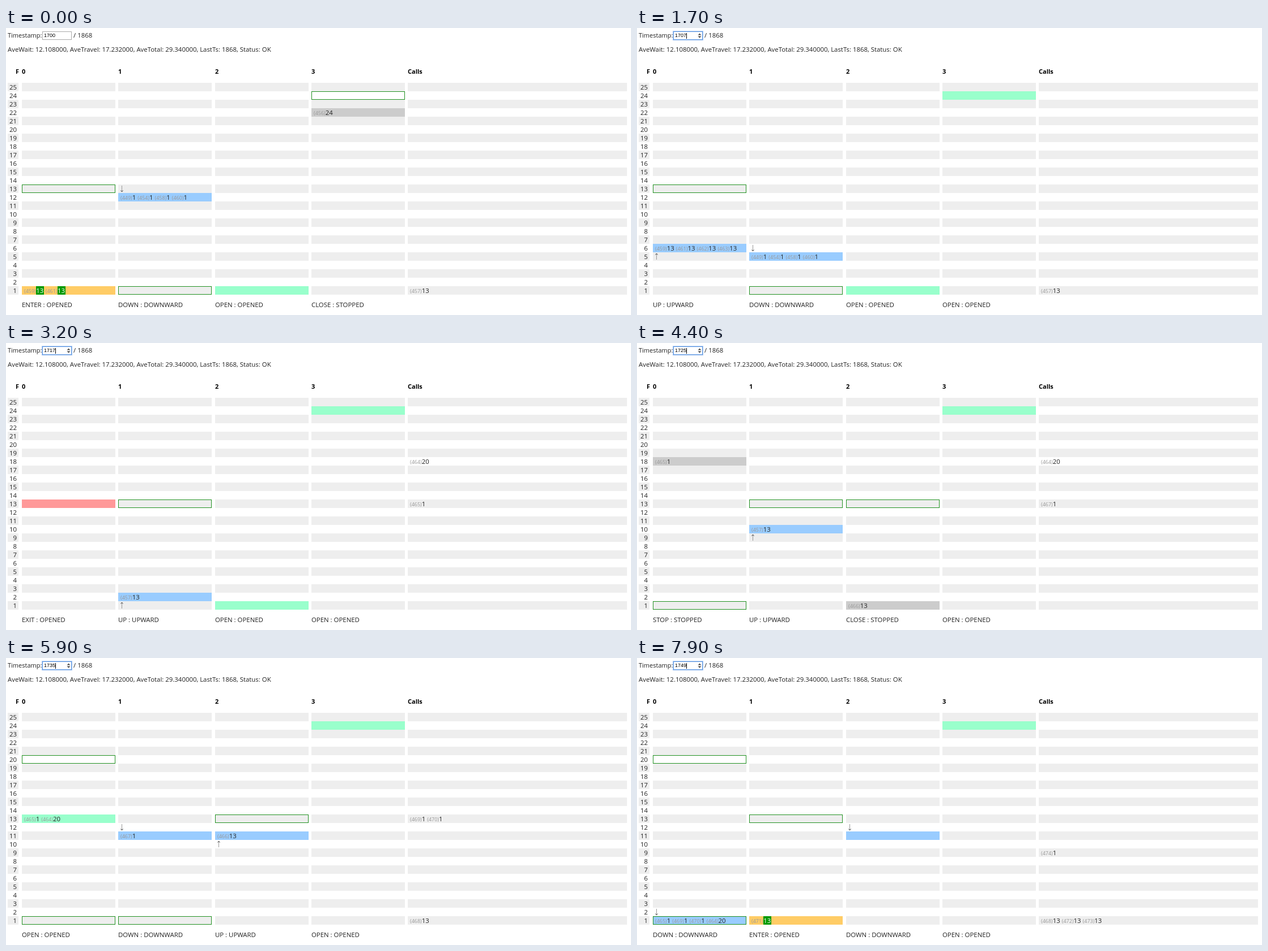
Write an HTML page that moves like this. It is 1103 px wide and 508 px high and loops after 8 s.

```html
<!DOCTYPE html>
<html lang="en">
<head>
<meta charset="utf-8">
<style>
  html, body { margin: 0; width: 100%; height: 100%; overflow: hidden; background: #fff; }
  body { position: relative; font: 11.4px/15px "Open Sans", "Noto Sans", sans-serif; color: #222; }
  body div { position: absolute; box-sizing: border-box; white-space: pre; }
  .head { font-weight: bold; color: #000; font-size: 11px; }
  .num { text-align: right; padding-right: 3px; }
  .odd { background: #eee; }
  .riders { display: flex; gap: 3px; padding-left: 4px; }
  .riders small { font-size: 9px; color: #999; }
  .riders b { font-weight: normal; background: #090; color: #fff; padding: 0 .5px; }
  .goal { border: 1px solid #229122; }
  svg { position: absolute; left: 0; top: 0; fill: none; }
  #field { left: 64px; top: 6px; width: 52px; height: 15px; border: 1px solid #aaa;
    font: 9px/13px "Liberation Sans", Arial, sans-serif; color: #000; padding-left: 2px; }
  #field.focus { border-color: #5b95e0; box-shadow: 0 0 0 1px #a9c8f2; }
  #field i { display: none; position: absolute; left: 22px; top: 2px; width: 1px; height: 10px; background: #000; }
  #field.focus i { display: block; }
  #field svg { display: none; left: 42px; top: 2px; fill: #444; }
  #field.hover svg { display: block; }
</style>
</head>
<body>
<div style="left:3px;top:5px;font-size:11px">Timestamp:</div>
<div id="field"><span id="stamp"></span><i></i><svg width="7" height="9"><path d="M0.5 3.5 3.5 0.5 6.5 3.5zM0.5 5.5 3.5 8.5 6.5 5.5z"/></svg></div>
<div style="left:119px;top:5px">/ 1868</div>
<div style="left:3px;top:30px">AveWait: 12.108000, AveTravel: 17.232000, AveTotal: 29.340000, LastTs: 1868, Status: OK</div>
<div id="grid"></div>
<div id="live"></div>
<script>
const LOOP = 8000, FLOORS = 25, CAR_W = 165, CALLS_X = 709, CALLS_W = 387;
const COLOR = { UP: '#9cf', DOWN: '#9cf', OPEN: '#9fc', ENTER: '#fc6', EXIT: '#f99', STOP: '#ccc', CLOSE: '#ccc' };
const STATE = { UP: 'UPWARD', DOWN: 'DOWNWARD', STOP: 'STOPPED', CLOSE: 'STOPPED' };
const $ = id => document.getElementById(id);
const carX = c => Math.round(28 + 170.4 * c);
const rowY = floor => 112 + (24 - floor) * 15;

// One command per tick; "UP*5" repeats it.
const cars = [
  [1, 'ENTER*2 CLOSE UP*12 STOP OPEN EXIT ENTER CLOSE UP*5 STOP OPEN ENTER CLOSE DOWN*5 STOP OPEN ENTER CLOSE DOWN*12'],
  [13, 'DOWN*12 STOP OPEN EXIT ENTER CLOSE UP*12 STOP OPEN EXIT ENTER CLOSE DOWN*12 STOP OPEN EXIT ENTER'],
  [1, 'OPEN*24 ENTER CLOSE UP*12 STOP OPEN EXIT OPEN*6 CLOSE DOWN*2'],
  [22, 'CLOSE UP*2 STOP OPEN EXIT OPEN*44']
].map(([floor, script]) => script.split(' ').flatMap(word => {
  const [cmd, n = 1] = word.split('*');
  return Array.from({ length: +n }, () => {
    const prev = floor;
    floor += cmd === 'UP' ? 1 : cmd === 'DOWN' ? -1 : 0;
    return { cmd, floor, prev };
  });
}));

// id, destination, car, boarding tick, then floor and tick of the call
const LATER = 99;
const people = [
  [449, 1, 1, -1], [454, 1, 1, -1], [456, 24, 3, -1], [457, 13, 1, 15, 1, 0],
  [458, 1, 1, -1], [459, 13, 0, 0], [460, 1, 1, -1], [461, 13, 0, 0],
  [462, 13, 0, 1], [463, 13, 0, 1], [464, 20, 0, 27, 18, 10], [465, 1, 0, 18, 13, 14],
  [466, 13, 2, 24], [467, 1, 1, 32, 13, 25], [468, 13, 0, LATER, 1, 28],
  [469, 1, 0, 36, 13, 31], [470, 1, 0, 36, 13, 34], [471, 13, 1, 49, 1, 38],
  [472, 13, 0, LATER, 1, 41], [473, 13, 0, LATER, 1, 44], [474, 1, 0, LATER, 9, 47]
].map(([id, dest, car, board, floor, call]) => {
  const exit = cars[car].findIndex((s, t) => t > board && s.cmd === 'EXIT');
  return { id, dest, car, board, floor, call, exit: exit < 0 ? Infinity : exit };
});

function box(x, y, w, cls = '', body = '', style = '') {
  return `<div class="${cls}" style="left:${x}px;top:${y}px;width:${w}px;height:15px;${style}">${body}</div>`;
}

function chip(p, t) {
  const tag = p.board === t ? 'b' : 'span';
  return `<span><small>(${p.id})</small><${tag}>${p.dest}</${tag}></span>`;
}

function arrow(up) {
  const flip = up ? ' transform="matrix(1 0 0 -1 0 15)"' : '';
  return `<svg width="13" height="15"><g${flip}><path d="M6.5 2V13" stroke="#999"/>` +
    '<path d="M4.5 10.5 6.5 13 8.5 10.5" stroke="#444"/></g></svg>';
}

function drawGrid() {
  let html = box(3, 69, 20, 'head', 'F', 'text-align:right');
  for (let c = 0; c < 4; c++) html += box(carX(c), 69, CAR_W, 'head', c);
  html += box(CALLS_X, 69, CALLS_W, 'head', 'Calls');
  for (let f = 1; f <= FLOORS; f++) {
    const odd = f % 2 ? 'odd' : '', y = rowY(f);
    html += box(3, y, 19, 'num ' + odd, f);
    for (let c = 0; c < 4; c++) html += box(carX(c), y, CAR_W, odd);
    html += box(CALLS_X, y, CALLS_W, odd);
  }
  $('grid').innerHTML = html;
}

function drawCar(c, t) {
  const { cmd, floor, prev } = cars[c][t], x = carX(c);
  const riders = people.filter(p => p.car === c && p.board <= t && t < p.exit)
    .sort((a, b) => a.dest - b.dest || a.id - b.id);
  let html = box(x, rowY(floor), CAR_W, 'riders', riders.map(p => chip(p, t)).join(''), `background:${COLOR[cmd]}`);
  if (prev !== floor) html += box(x, rowY(prev), CAR_W, '', arrow(cmd === 'UP'));
  for (const dest of new Set(riders.map(p => p.dest))) html += box(x, rowY(dest), CAR_W, 'goal');
  return html + box(x, 482, CAR_W, '', `${cmd} : ${STATE[cmd] || 'OPENED'}`);
}

function drawCalls(t) {
  const waiting = people.filter(p => p.call <= t && t < p.board);
  return [...new Set(waiting.map(p => p.floor))].map(f =>
    box(CALLS_X, rowY(f), CALLS_W, 'riders', waiting.filter(p => p.floor === f).map(p => chip(p, t)).join(''))
  ).join('');
}

// The pointer and the focus come first, then the ticks.
const stepTime = i => 500 + 150 * i - (i % 2 ? 50 : i > 47 ? 100 : 0);

function stepAt(ms) {
  let i = -1;
  while (i < 50 && stepTime(i + 1) <= ms) i++;
  return i;
}

let shown;
function frame() {
  const step = stepAt(performance.now() % LOOP);
  if (step !== shown) {
    shown = step;
    const t = Math.max(0, step - 1);
    $('stamp').textContent = 1700 + t;
    $('field').className = step < 0 ? '' : step < 1 ? 'hover' : 'hover focus';
    $('live').innerHTML = cars.map((_, c) => drawCar(c, t)).join('') + drawCalls(t);
  }
  requestAnimationFrame(frame);
}

drawGrid();
frame();
</script>
</body>
</html>
```
